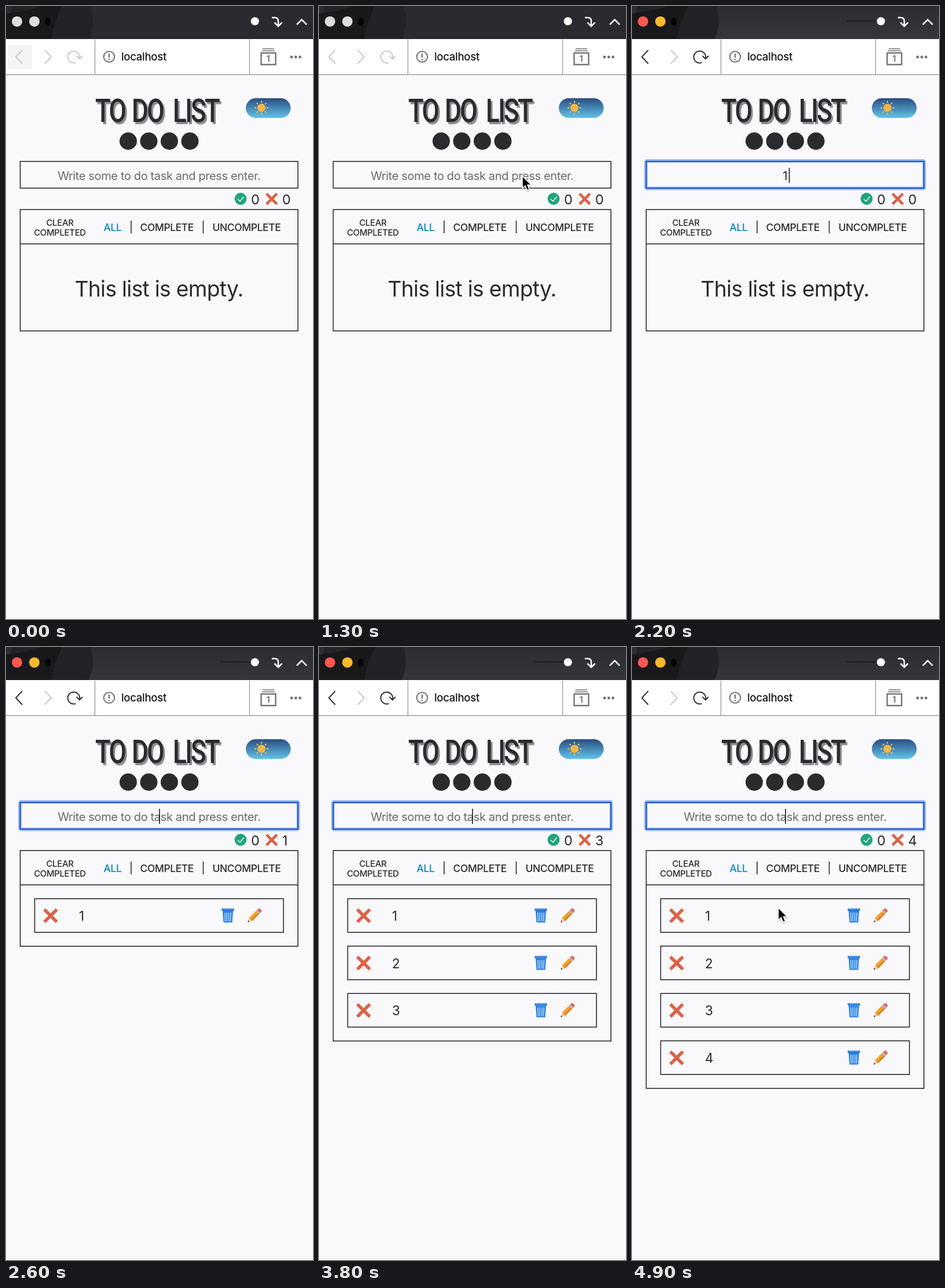
These frames come from a looping animation (530 px wide and 1057 px high, 5000 ms). An HTML page:

```html
<!DOCTYPE html>
<html lang="en">
<head>
<meta charset="utf-8">
<title>To do list</title>
<style>
  html, body { margin: 0; width: 100%; height: 100%; overflow: hidden; background: #f9f8fb; }
  svg { display: block; width: 100%; height: 100%; }
  text { font-family: Inter, Roboto, sans-serif; font-optical-sizing: none; letter-spacing: -.02em; fill: #2b2a2e; }
  .mid { text-anchor: middle; }
  .line { fill: none; stroke: #1f1e21; stroke-width: 1.5; }
  .icon { fill: none; stroke-width: 2; }
  .tab { font-size: 17.4px; font-weight: 500; }
  .small { font-size: 14.9px; font-weight: 500; text-anchor: middle; }
  .count { font-size: 23.5px; }
  .title { font: 500 44px Roboto, sans-serif; letter-spacing: -2.6px;
    filter: drop-shadow(3.5px 3px .6px #8d8c90); }
</style>
</head>
<body>
<svg viewBox="0 0 530 1057" preserveAspectRatio="none">
  <defs>
    <linearGradient id="sky" x2="0" y2="1">
      <stop stop-color="#2b4d82"/><stop offset="1" stop-color="#62c3e8"/>
    </linearGradient>
    <linearGradient id="bar" x2="0" y2="1">
      <stop stop-color="#2c2d30"/><stop offset="1" stop-color="#35373a"/>
    </linearGradient>
    <filter id="glow" x="-20%" y="-40%" width="140%" height="180%"><feGaussianBlur stdDeviation="2.5"/></filter>
    <filter id="soft" x="-50%" y="-50%" width="200%" height="200%">
      <feDropShadow dx="0" dy="1.5" stdDeviation="1.2" flood-opacity=".35"/>
    </filter>
    <path id="cross" d="M-9-9L9 9M9-9L-9 9" fill="none" stroke="#dd6146" stroke-width="4.6"/>
    <g id="trash">
      <path d="M-9-8H9L7.5 12H-7.5z" fill="#2a82e4"/>
      <path d="M-5.2-5L-4.6 10M-1.7-5V10M1.7-5V10M5.2-5L4.6 10" stroke="#cfe4fb" stroke-width="1.3"/>
      <path d="M-10.5-12H10.5V-8H-10.5z" fill="#1f6fd0"/>
      <path d="M-9-10.3H9" stroke="#6db0f5"/>
    </g>
    <g id="pencil" transform="rotate(-45)">
      <path d="M-16 0L-9-3.8V3.8z" fill="#f3d2a4"/>
      <path d="M-16 0L-13-1.6V1.6z" fill="#3a3436"/>
      <path d="M-9-3.8H8V3.8H-9z" fill="#f3a02f"/>
      <path d="M-9 1.4H8V3.8H-9z" fill="#d87a1c"/>
      <path d="M8-3.8H11V3.8H8z" fill="#a9b4bd"/>
      <path d="M11-3.8H13Q16-3.8 16 0T13 3.8H11z" fill="#e2685c"/>
    </g>
    <path id="bar-i" d="M-4.5-10.5Q0-10.5 0-7Q0-10.5 4.5-10.5M0-7V7M-4.5 10.5Q0 10.5 0 7Q0 10.5 4.5 10.5M-3 2.5H3"/>
  </defs>

  <!-- window bar -->
  <rect id="head" width="530" height="57"/>
  <clipPath id="headClip"><rect width="530" height="57"/></clipPath>
  <g clip-path="url(#headClip)">
    <circle cx="78" cy="25" r="72" fill="#232226"/>
    <path d="M0 13Q40 8 62 0H97Q83 25 78 57H0z" fill="#19181b"/>
  </g>
  <ellipse cx="72" cy="27" rx="5" ry="7" fill="#050505"/>
  <circle id="red" cx="19" cy="26.7" r="9"/>
  <circle id="amber" cx="49" cy="26.7" r="9"/>
  <path id="slider" d="M370 26H424" stroke="#222326" stroke-width="3"/>
  <circle cx="429.7" cy="26.2" r="7" fill="#fff"/>
  <path d="M459 20H464Q470 20 470 26V34M463.5 28.5L470 35 476.5 28.5M502 32L510.5 23.5 519 32"
    fill="none" stroke="#fff" stroke-width="2.5"/>

  <!-- toolbar -->
  <path d="M0 57H530V118H0z" fill="#fff"/>
  <path d="M0 118.3H530M153.5 58V118M420.5 58V118" stroke="#909092" stroke-width="1.2"/>
  <rect id="hover" x="3" y="67" width="42" height="42" rx="4" fill="#f3f4f5"/>
  <path id="back" class="icon" d="M28 76L17 87.7 28 99.5"/>
  <path class="icon" d="M67 76L78 87.7 67 99.5" stroke="#c9c9cb"/>
  <path id="reload" class="icon" d="M120.5 97.6A10.3 10.3 0 1 1 127 90M121.5 86L127 91.3 132 86"/>
  <g class="icon" stroke="#747476">
    <circle cx="178" cy="87.5" r="9.3"/>
    <path d="M178 82V89M178 91V93.3" stroke-width="2.4"/>
    <path d="M440.5 81H465.5V101H440.5z" stroke-width="2.4"/>
    <path d="M443 73.7H463M442 77.2H464" stroke-width="1.5"/>
  </g>
  <text class="mid" x="452.5" y="95.5" font-size="14" font-weight="600" style="fill:#666">1</text>
  <g fill="#717173"><circle cx="493" cy="88" r="2.4"/><circle cx="500.3" cy="88" r="2.4"/><circle cx="507.5" cy="88" r="2.4"/></g>
  <text x="199" y="93.5" font-size="18.7" font-weight="500" style="fill:#161617">localhost</text>

  <!-- page header -->
  <text class="title" transform="translate(154 200) scale(1 1.27)">TO <tspan x="63">DO </tspan><tspan x="134">LIST</tspan></text>
  <rect x="413" y="157" width="80" height="38" rx="19" fill="#fff" filter="url(#glow)"/>
  <rect x="414" y="159" width="77.5" height="34" rx="17" fill="url(#sky)"/>
  <g id="sun" transform="translate(441 175.5)"><circle r="7" fill="#f6b543"/></g>
  <g fill="#2b2a2e">
    <circle cx="211" cy="233" r="15"/><circle cx="246.5" cy="233" r="15"/>
    <circle cx="282" cy="233" r="15"/><circle cx="317.5" cy="233" r="15"/>
  </g>

  <!-- entry field -->
  <rect id="halo" fill="none" stroke="#9cbcf2"/>
  <rect id="field" class="line" x="24.5" y="268" width="479.5" height="46"/>
  <text id="hint" class="mid" x="264.3" y="300" font-size="20.1" style="fill:#6a696d">Write some to do task and press enter.</text>
  <text id="typed" class="mid" x="264.3" y="300" font-size="20.5"></text>
  <path id="caret" d="M0 279V305" stroke="#111" stroke-width="1.5"/>

  <!-- counters -->
  <circle cx="405" cy="332.5" r="10.4" fill="#20a57a"/>
  <path d="M400 333L404 336.8 410.5 328.8" fill="none" stroke="#fff" stroke-width="1.4"/>
  <use href="#cross" x="458.7" y="332.7"/>
  <text class="count" x="423" y="341.5">0</text>
  <text class="count" id="open" x="476.7" y="341.5"></text>

  <!-- list -->
  <rect id="frame" class="line" x="24.5" y="351" width="479.5"/>
  <path class="line" d="M24.5 410.3H504M216 370V392M340.5 370V392"/>
  <text class="small" x="93" y="378.7">CLEAR</text>
  <text class="small" x="93" y="396.3">COMPLETED</text>
  <text class="tab" x="168.5" y="387.5" style="fill:#0d84bb">ALL</text>
  <text class="tab" x="231.5" y="387.5">COMPLETE</text>
  <text class="tab" x="356.5" y="387.5">UNCOMPLETE</text>
  <text id="empty" class="mid" x="264" y="500.5" font-size="37.3" font-weight="440">This list is empty.</text>
  <g id="items"></g>

  <!-- pointers -->
  <path id="arrow" d="M0 0V21.5L4.9 17 8.2 24.8 12.2 23.1 9 15.5H15.5z" stroke="#fff" stroke-width="1.5" filter="url(#soft)"/>
  <g id="beam" fill="none" transform="translate(351 293.5)">
    <use href="#bar-i" stroke="#fff" stroke-width="3.5"/>
    <use href="#bar-i" stroke="#111" stroke-width="1.6"/>
  </g>
</svg>
<script>
  const $ = id => document.getElementById(id);
  const set = (id, attrs) => { for (const k in attrs) $(id).setAttribute(k, attrs[k]); };
  const show = (id, on) => $(id).style.display = on ? '' : 'none';
  const write = (id, s) => { if ($(id).textContent !== s) $(id).textContent = s; };

  const LOOP = 5000, STEP = 100, ROW = 81.7;
  const FOCUS = 1700;
  const typedAt = [2200, 2900, 3500, 4300];
  const addedAt = [2600, 3200, 3800, 4500];
  // time, x, y of the arrow's tip
  const path = [[600, 514, 551], [700, 488, 495], [800, 458, 420], [900, 437, 356], [1000, 429, 331],
    [1100, 388, 303], [1200, 362, 296], [1300, 351, 293], [1700, 351, 293]];

  for (let i = 0; i < 8; i++)
    $('sun').innerHTML += `<path d="M0-8.8V-11.8" stroke="#f4c65a" stroke-width="2" transform="rotate(${i * 45})"/>`;

  $('items').innerHTML = addedAt.map((_, i) => `<g transform="translate(0 ${i * ROW})">
    <rect class="line" x="49.5" y="434" width="429.5" height="58"/>
    <use href="#cross" transform="translate(77 463.3) scale(1.2)"/>
    <text x="126" y="472" font-size="22.5">${i + 1}</text>
    <use href="#trash" x="383" y="463"/><use href="#pencil" x="428.5" y="463.5"/></g>`).join('');

  function pointer(t) {
    if (t >= 4800) return t < 4900 ? [256, 446] : [252.5, 449.5];
    if (t < path[0][0] || t >= FOCUS) return null;
    const i = path.findIndex(p => p[0] > t);
    const [a, b] = [path[i - 1], path[i]], f = (t - a[0]) / (b[0] - a[0]);
    return [a[1] + (b[1] - a[1]) * f, a[2] + (b[2] - a[2]) * f];
  }

  function draw(t) {
    const active = t >= FOCUS;
    const count = addedAt.filter(a => t >= a).length;
    const typing = typedAt.filter(a => t >= a).length > count;

    set('head', { fill: active ? 'url(#bar)' : '#2b2a2e' });
    set('red', { fill: active ? '#fe5850' : '#dddce0' });
    set('amber', { fill: active ? '#fdb92c' : '#dddce0' });
    set('back', { stroke: active ? '#333335' : '#c9c9cb' });
    set('reload', { stroke: active ? '#333335' : '#c9c9cb' });
    show('slider', active);
    show('hover', t < 100);

    // the focus halo shrinks onto the field
    const grow = t < 1800 ? 1.5 : 0;
    show('halo', active);
    set('halo', { x: 24 - grow, y: 267 - grow, width: 480.5 + 2 * grow, height: 47.5 + 2 * grow, rx: 2, 'stroke-width': 6 });
    $('field').style.stroke = active ? '#2455c4' : '';
    $('field').style.strokeWidth = active ? 2.2 : '';

    show('hint', !typing);
    write('typed', typing ? String(count + 1) : '');
    show('caret', t >= typedAt[0]);
    set('caret', { transform: `translate(${typing ? 271.5 : 265} 0)` });

    write('open', String(count));
    show('empty', !count);
    set('frame', { height: count ? 165 + (count - 1) * ROW : 209.3 });
    [...$('items').children].forEach((g, i) => g.style.display = i < count ? '' : 'none');

    const p = pointer(t);
    show('arrow', p);
    if (p) set('arrow', { transform: `translate(${p})` });
    show('beam', active && t < typedAt[0]);
  }

  const start = performance.now();
  function tick() {
    const t = (performance.now() - start) % LOOP;
    draw(Math.floor(t / STEP) * STEP);
    requestAnimationFrame(tick);
  }
  tick();
</script>
</body>
</html>
```
